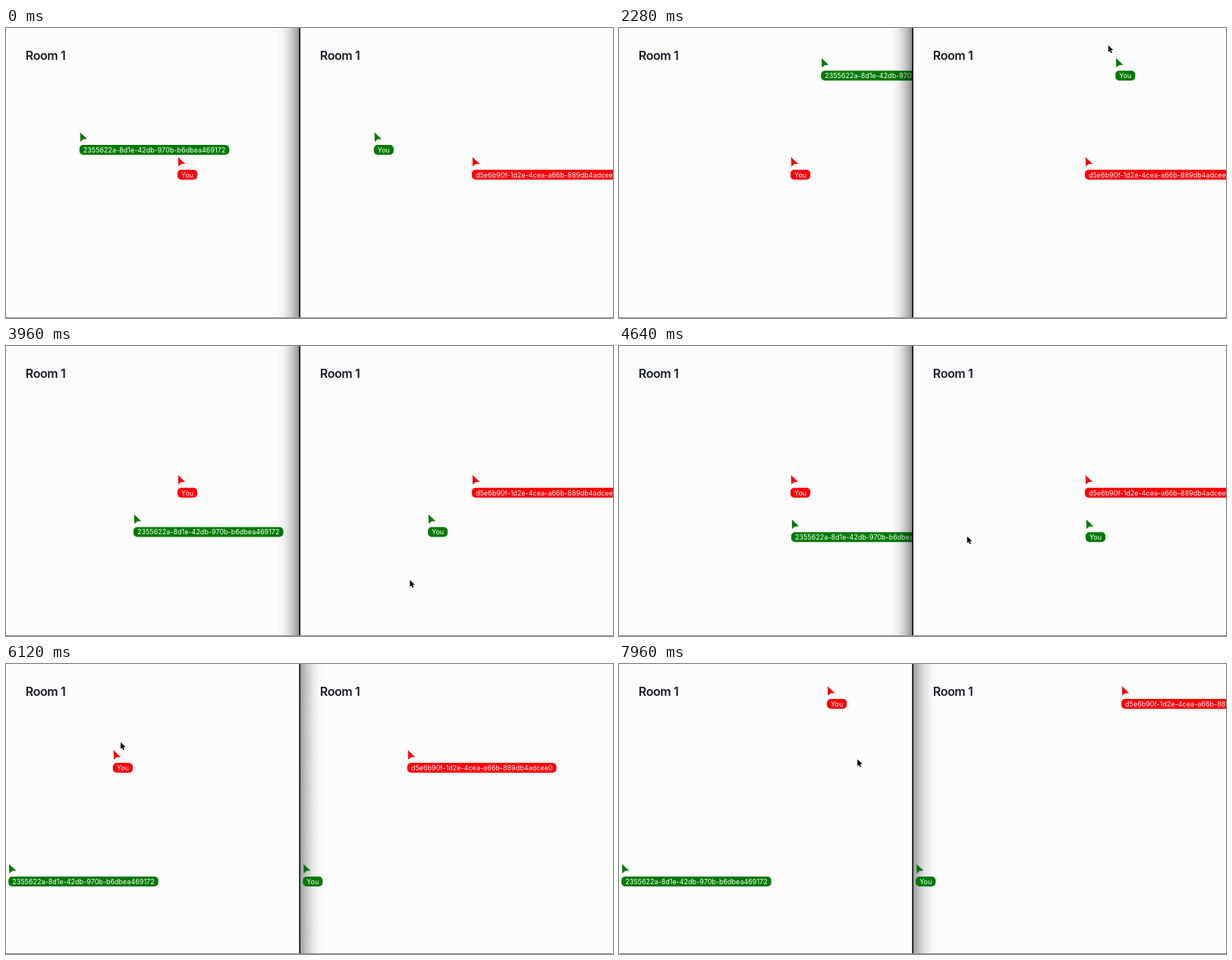
These frames come from a looping animation (800 px wide and 382 px high, 8000 ms). An HTML page with a canvas:

```html
<!DOCTYPE html>
<html lang="en">
<head>
<meta charset="utf-8">
<title>Live cursors</title>
<style>
  html, body { margin: 0; width: 100%; height: 100%; overflow: hidden; background: #fdfcfd; }
  canvas { display: block; width: 800px; height: 382px; }
</style>
</head>
<body>
<canvas></canvas>
<script>
const WIDTH = 800, HEIGHT = 382, DIVIDER = 388, LOOP = 8000;
const POINTER_SHOWS = 100, HANDOVER = 4760, HANDOVER_TIME = 240, FOCUS_SWITCH = 4960;
const FOLLOW_LAG = 100; // ms by which a label trails the pointer that drags it
const FONT = 'Inter, "Open Sans", sans-serif';

const canvas = document.querySelector('canvas');
const ctx = canvas.getContext('2d');
const ratio = window.devicePixelRatio || 1;
canvas.width = WIDTH * ratio;
canvas.height = HEIGHT * ratio;

// Each path is a few [time, x, y] turning points, relative to the pane.
const green = {
  color: '#007a00', id: '2355622a-8d1e-42db-970b-b6dbea469172', home: 1,
  path: [
    [0, 96.8, 137], [920, 131.2, 269], [1680, 240, 320], [2280, 266.3, 39.5],
    [2800, 140, 130], [3240, 270, 305], [3700, 230, 60], [4160, 150, 345],
    [4540, 330, 215], [4640, 228.5, 228], [4740, 30, 258], [4900, 3.2, 263]
  ]
};
const red = {
  color: '#fb0007', id: 'd5e6b90f-1d2e-4cea-a66b-889db4adcee0', home: 0,
  path: [
    [5000, 226, 169.7], [5600, 190, 232], [6120, 140.8, 113.3], [6800, 310, 110],
    [7560, 190, 272], [7900, 258, 30], [7960, 273.7, 28], [8100, 336, 214]
  ]
};

// Smooth cubic through the points, resting at both ends.
function sample(path, time) {
  const last = path.length - 1;
  if (time <= path[0][0]) return path[0].slice(1);
  if (time >= path[last][0]) return path[last].slice(1);
  const i = path.findIndex(point => point[0] > time) - 1;
  const a = path[i], b = path[i + 1], span = b[0] - a[0];
  const u = (time - a[0]) / span;
  const slope = (k, axis) => k === 0 || k === last ? 0 :
    (path[k + 1][axis] - path[k - 1][axis]) / (path[k + 1][0] - path[k - 1][0]);
  return [1, 2].map(axis =>
    a[axis] + (b[axis] - a[axis]) * u * u * (3 - 2 * u) +
    span * u * (1 - u) * (slope(i, axis) * (1 - u) - slope(i + 1, axis) * u));
}

// A label eases toward the pointer, so the pointer leads it by lag * velocity.
function leadOf(user, time) {
  const [x, y] = sample(user.path, time);
  const [nextX, nextY] = sample(user.path, time + 1);
  return [
    user.home * DIVIDER + x + FOLLOW_LAG * (nextX - x),
    y + FOLLOW_LAG * (nextY - y)
  ];
}

function pointerAt(time) {
  const u = Math.min(1, Math.max(0, (time - HANDOVER) / HANDOVER_TIME));
  const mix = u * u * (3 - 2 * u);
  const from = leadOf(green, time), to = leadOf(red, time);
  return from.map((value, axis) => value + (to[axis] - value) * mix);
}

function polygon(points) {
  ctx.beginPath();
  points.forEach(([x, y]) => ctx.lineTo(x, y));
  ctx.closePath();
}

function drawUser(user, pane, time) {
  const label = pane === user.home ? 'You' : user.id;
  ctx.save();
  ctx.translate(...sample(user.path, time));
  ctx.fillStyle = user.color;
  polygon([[0.8, 0.4], [10.2, 9.2], [5, 9.6], [1.2, 12.9]]);
  ctx.fill();
  ctx.font = `9px ${FONT}`;
  ctx.beginPath();
  ctx.roundRect(0, 17, ctx.measureText(label).width + 10, 13, 5);
  ctx.fill();
  ctx.fillStyle = '#fff';
  ctx.fillText(label, 5, 26.8);
  ctx.restore();
}

function drawShadow(from, to, strength) {
  const shade = ctx.createLinearGradient(from, 0, to, 0);
  for (let u = 0; u <= 1; u += 0.125) {
    shade.addColorStop(u, `rgba(0,0,0,${strength * (1 - u) ** 2})`);
  }
  ctx.fillStyle = shade;
  ctx.fillRect(Math.min(from, to), 0, Math.abs(to - from), HEIGHT);
}

function drawPane(pane, time) {
  const focused = time < FOCUS_SWITCH ? 1 : 0;
  ctx.save();
  ctx.translate(pane * DIVIDER, 0);
  ctx.beginPath();
  ctx.rect(0, 0, pane ? WIDTH - DIVIDER : DIVIDER, HEIGHT);
  ctx.clip();
  if (pane === 1 && focused === 0) drawShadow(0, 32, 0.38);
  ctx.fillStyle = '#161c24';
  ctx.font = `600 16px ${FONT}`;
  ctx.letterSpacing = '-0.4px';
  ctx.fillText('Room 1', 25.8, 42);
  ctx.letterSpacing = '0px';
  drawUser(green, pane, time);
  drawUser(red, pane, time);
  if (pane === 0 && focused === 1) drawShadow(DIVIDER, DIVIDER - 32, 0.48);
  ctx.restore();
}

function drawPointer(time) {
  if (time < POINTER_SHOWS) return;
  ctx.save();
  ctx.translate(...pointerAt(time));
  polygon([[0, 0], [0, 9], [2, 7.2], [3.4, 10.4], [4.9, 9.7], [3.5, 6.6], [6.4, 6.4]]);
  ctx.strokeStyle = '#fff';
  ctx.lineWidth = 1.4;
  ctx.stroke();
  ctx.fillStyle = '#000';
  ctx.fill();
  ctx.restore();
}

function draw(time) {
  ctx.setTransform(ratio, 0, 0, ratio, 0, 0);
  ctx.fillStyle = '#fdfcfd';
  ctx.fillRect(0, 0, WIDTH, HEIGHT);
  drawPane(0, time);
  drawPane(1, time);
  ctx.fillStyle = '#111';
  ctx.fillRect(DIVIDER - 1.7, 0, 1.7, HEIGHT);
  ctx.fillStyle = '#8c8c8c';
  ctx.fillRect(0, HEIGHT - 1, WIDTH, 1);
  drawPointer(time);
}

const start = performance.now();
function tick() {
  draw((performance.now() - start) % LOOP);
  requestAnimationFrame(tick);
}
tick();
</script>
</body>
</html>
```
